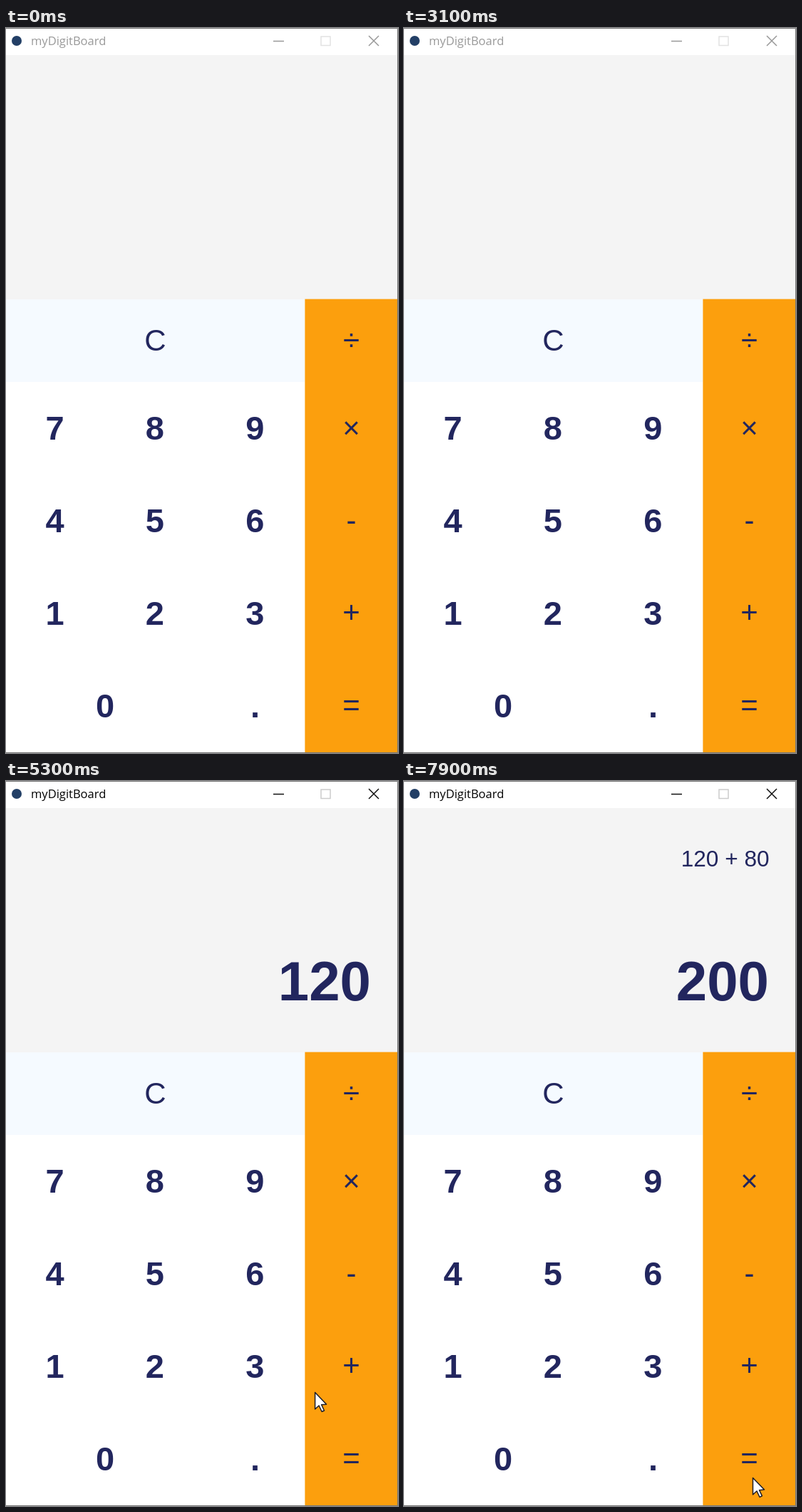
An HTML page that plays this animation: 550x1018 px, repeating every 8000 ms.

```html
<!DOCTYPE html>
<html lang="en">
<head>
<meta charset="utf-8">
<title>Calculator</title>
<style>
  html, body { margin: 0; width: 100%; height: 100%; overflow: hidden; background: #fff; }
  svg { display: block; width: 100%; height: 100%; }
  text { fill: #22265e; font-family: "Liberation Sans", Arial, sans-serif; white-space: pre; }
  .digit { font-size: 47px; font-weight: bold; text-anchor: middle; }
  .operator { font-size: 42px; text-anchor: middle; }
  #total { font-size: 78px; font-weight: bold; text-anchor: end; }
  #history { font-size: 31.6px; text-anchor: end; }
  #title { font: 16.5px "Open Sans", "Noto Sans", sans-serif; }
</style>
</head>
<body>
<svg viewBox="0 0 550 1018" preserveAspectRatio="none">
  <rect width="550" height="1018" fill="#fff"/>
  <rect y="38" width="550" height="343" fill="#f4f4f4"/>
  <rect y="381" width="419" height="116" fill="#f5faff"/>
  <rect x="419.4" y="380.6" width="131" height="638" fill="#fc9f0d"/>

  <circle cx="15" cy="18" r="7" fill="#233f66"/>
  <text id="title" x="35" y="24">myDigitBoard</text>
  <g fill="none" stroke-width="1.5">
    <path id="controls" d="M375 18.5h15M509 11l14 14m0-14l-14 14"/>
    <rect id="maximize" x="442" y="12" width="13" height="12.5"/>
  </g>

  <text id="history" x="512.6" y="119.5"></text>
  <text id="total" x="512" y="307.5"></text>
  <g id="keys"></g>

  <path d="M0 .5H549.5V1017.5H0" fill="none" stroke="#777"/>
  <path id="cursor" d="M.5 .5V24l5.5-5 4 8.5 3.4-1.6-3.9-8.2 7-.6z"
        fill="#fff" stroke="#1c1c26" stroke-width="1.5" stroke-linejoin="round"/>
</svg>
<script>
const LOOP = 8000;
const COLUMN = 140.4;
const ROW = 130;
const byId = id => document.getElementById(id);
const keys = {};

function addKey(label, x, y, className) {
  const key = document.createElementNS("http://www.w3.org/2000/svg", "text");
  key.setAttribute("x", x);
  key.setAttribute("y", y);
  key.setAttribute("class", className);
  key.textContent = label;
  byId("keys").append(key);
  keys[label] = { x, y: y + 3 };
}

for (let n = 1; n <= 9; n++) {
  const column = (n - 1) % 3;
  const row = 2 - Math.floor((n - 1) / 3);
  addKey(n, 68.5 + column * COLUMN, 577.5 + row * ROW, "digit");
}
addKey("0", 139, 967.5, "digit");
addKey(".", 349.5, 967.5, "digit");
addKey("C", 209.5, 453, "operator");
addKey("÷", 484.5, 453, "operator");
[..."×-+="].forEach((sign, i) => addKey(sign, 484.5, 575.8 + i * 129.8, "operator"));

// The pointer visits keys, which it presses, and a few free points.
const route = [
  { at: 3600, x: 585, y: 90 },
  { at: 4400, key: "1" },
  { at: 4700, key: "2" },
  { at: 5000, key: "0" },
  { at: 5490, key: "+" },
  { at: 5900, x: 368, y: 782 },
  { at: 6300, key: "8" },
  { at: 6800, key: "0" },
  { at: 7330, key: "=" },
  { at: 7900, x: 489, y: 978 }
].map(stop => ({ ...stop, ...keys[stop.key] }));

const firstPress = route.find(stop => stop.key).at;
const easeOut = k => 1 - (1 - k) ** 2;

function pointerAt(t) {
  const next = route.findIndex(stop => stop.at > t);
  if (next < 1) return next ? route.at(-1) : route[0];
  const from = route[next - 1];
  const to = route[next];
  const k = easeOut((t - from.at) / (to.at - from.at));
  return { x: from.x + (to.x - from.x) * k, y: from.y + (to.y - from.y) * k };
}

function calculate(presses) {
  let history = "";
  let total = "";
  for (const key of presses) {
    if (key === "+") {
      history = total + " + ";
      total = "";
    } else if (key === "=") {
      history += total;
      total = history.split("+").reduce((sum, term) => sum + Number(term), 0);
    } else {
      total += key;
    }
  }
  return { history, total };
}

function draw(t) {
  const presses = route.filter(stop => stop.key && stop.at <= t).map(stop => stop.key);
  const { history, total } = calculate(presses);
  const active = t >= firstPress;
  const { x, y } = pointerAt(t);
  byId("history").textContent = history;
  byId("total").textContent = total;
  byId("title").style.fill = active ? "#000" : "#999";
  byId("controls").setAttribute("stroke", active ? "#111" : "#999");
  byId("maximize").setAttribute("stroke", active ? "#ccc" : "#e2e2e2");
  byId("cursor").setAttribute("transform", `translate(${x} ${y})`);
}

const start = performance.now();
function tick() {
  draw((performance.now() - start) % LOOP);
  requestAnimationFrame(tick);
}
tick();
</script>
</body>
</html>
```
